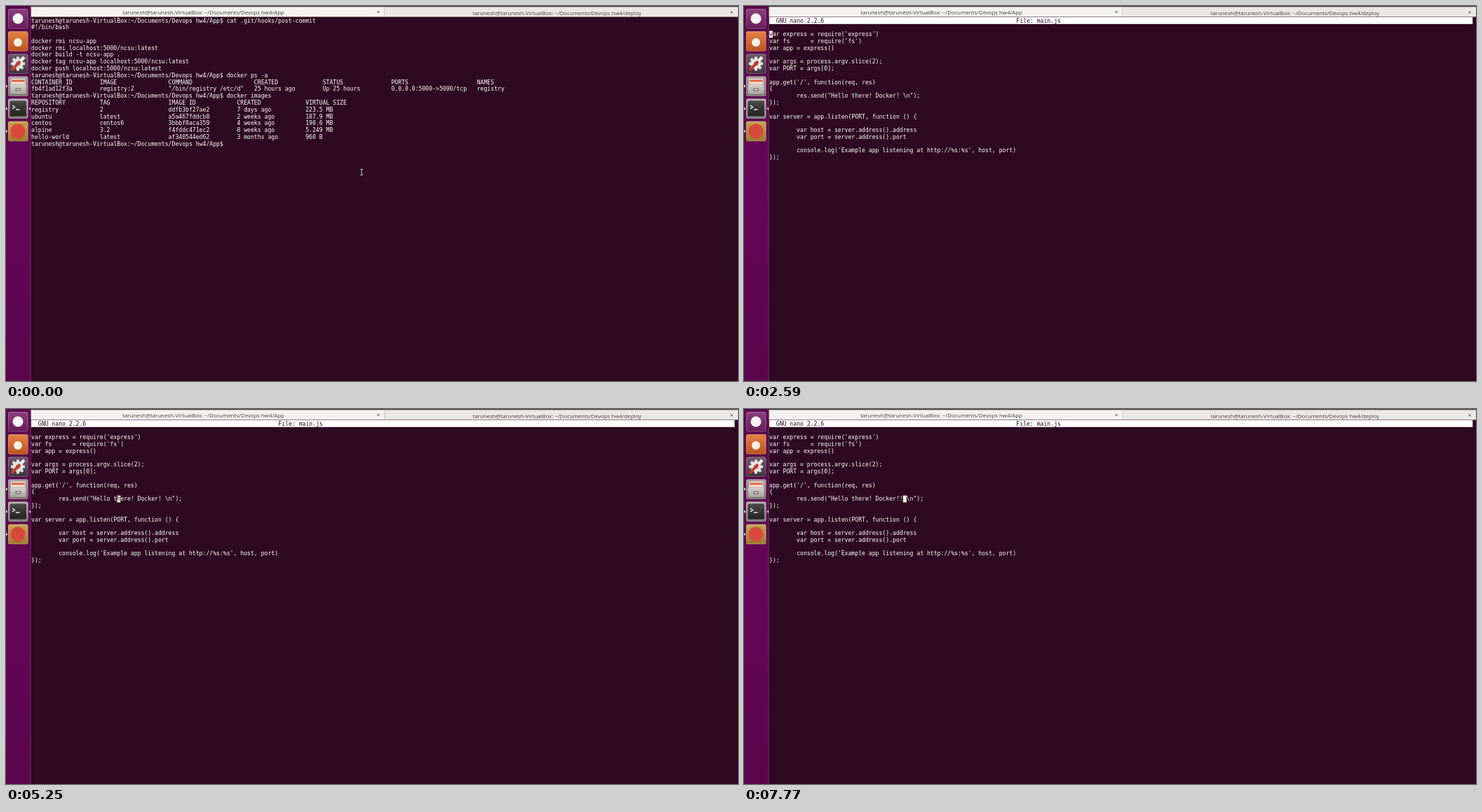
An HTML page with a canvas that plays this animation: 1044 by 536 pixels, repeating every 8 s.

```html
<!DOCTYPE html>
<html lang="en">
<head>
<meta charset="utf-8">
<title>Terminal session</title>
<style>
  html, body { margin: 0; width: 100%; height: 100%; overflow: hidden; background: #2e0922; }
  canvas { display: block; }
</style>
</head>
<body>
<canvas id="stage" width="1044" height="536"></canvas>
<script>
const ctx = document.getElementById('stage').getContext('2d');
const LOOP = 8000, TICK = 70;
const SCALE = 1044 / 1920;           // the desktop is 1920 units wide
const CELL_W = 9, CELL_H = 18;       // in desktop units
const LEFT = 36 / SCALE, TOP = 16 / SCALE;
const COLS = 205;
const BG = '#2e0922', FG = '#ffffff';
const MONO = '14.95px "DejaVu Sans Mono", monospace';
const SANS = '14.38px "Open Sans", "Noto Sans", sans-serif';

const USER = 'tarunesh@tarunesh-VirtualBox:';
const PROMPT = USER + '~/Documents/Devops hw4/App$ ';
const COMMAND = 'sudo nano main.js ';

// Lay out words at fixed columns
function table(cols, rows) {
  return rows.map(row => row.split('|').reduce((line, word, i) => line.padEnd(cols[i]) + word, ''));
}

const SHELL = [
  PROMPT + 'cat .git/hooks/post-commit',
  '#!/bin/bash',
  '',
  'docker rmi ncsu-app',
  'docker rmi localhost:5000/ncsu:latest',
  'docker build -t ncsu-app .',
  'docker tag ncsu-app localhost:5000/ncsu:latest',
  'docker push localhost:5000/ncsu:latest',
  PROMPT + 'docker ps -a',
  ...table([0, 20, 40, 65, 85, 105, 130], [
    'CONTAINER ID|IMAGE|COMMAND|CREATED|STATUS|PORTS|NAMES',
    'fb4f1ad12f3a|registry:2|"/bin/registry /etc/d"|25 hours ago|Up 25 hours|0.0.0.0:5000->5000/tcp|registry'
  ]),
  PROMPT + 'docker images',
  ...table([0, 20, 40, 60, 80], [
    'REPOSITORY|TAG|IMAGE ID|CREATED|VIRTUAL SIZE',
    'registry|2|ddfb3bf27ae2|7 days ago|223.5 MB',
    'ubuntu|latest|a5a467fddcb8|2 weeks ago|187.9 MB',
    'centos|centos6|3bbbf0aca359|4 weeks ago|190.6 MB',
    'alpine|3.2|f4fddc471ec2|8 weeks ago|5.249 MB',
    'hello-world|latest|af340544ed62|3 months ago|960 B'
  ])
];

const TAB = ' '.repeat(8);
const CODE = [
  '', '',
  "var express = require('express')",
  "var fs      = require('fs')",
  'var app = express()',
  '',
  'var args = process.argv.slice(2);',
  'var PORT = args[0];',
  '',
  "app.get('/', function(req, res)",
  '{',
  TAB + 'res.send("Hello there! Docker! \\n");',
  '});',
  '',
  'var server = app.listen(PORT, function () {',
  '',
  TAB + 'var host = server.address().address',
  TAB + 'var port = server.address().port',
  '',
  TAB + "console.log('Example app listening at http://%s:%s', host, port)",
  '});'
];
const EDIT_ROW = 11, EDIT_COL = 38;
const OPEN_AT = 2590, EDIT_AT = 6370, SAVE_AT = 7770, POINTER_UNTIL = 980;

// Typing: time of first key in a burst, then the typed lengths one tick apart
const typed = [];
function burst(start, ...lengths) {
  lengths.forEach((n, i) => typed.push([start + i * TICK, n]));
}
burst(980, 0, 1, 2);
burst(1260, 3, 4, 5);
burst(1540, 6, 7, 8);
burst(1820, 9, 10);
burst(2100, 11, 18);

// Cursor keys: time, row, column, visible
const cursor = [];
const put = (time, row, col, on = true) => cursor.push([time, row, col, on]);
put(0, 18, PROMPT.length, false);
put(210, 18, PROMPT.length);
put(700, 18, PROMPT.length, false);
typed.forEach(([time, n]) => put(time, 18, PROMPT.length + n));
put(OPEN_AT, 2, 0);
put(3080, 2, 0, false);
put(3220, 2, 0);
put(3290, 3, 0);
put(3710, 5, 0);
put(3780, 8, 0);
put(3850, 10, 0);
put(4060, EDIT_ROW, 0);
put(4340, EDIT_ROW, 8);
for (let i = 0; i < 12; i++) put(4760 + i * TICK, EDIT_ROW, 11 + 2 * i);
put(5600, EDIT_ROW, 36);
put(5670, EDIT_ROW, EDIT_COL);
put(EDIT_AT, EDIT_ROW, EDIT_COL + 1);
put(6860, EDIT_ROW, EDIT_COL + 1, false);
put(7420, EDIT_ROW, EDIT_COL + 1);
put(7630, EDIT_ROW, EDIT_COL + 1, false);
put(SAVE_AT, EDIT_ROW, EDIT_COL + 1);

const latest = (list, t) => list.filter(item => item[0] <= t).pop();

function box(x, y, w, h, fill, r = 0) {
  ctx.fillStyle = fill;
  ctx.beginPath();
  ctx.roundRect(x, y, w, h, r);
  ctx.fill();
}

function disc(x, y, r, fill) {
  ctx.fillStyle = fill;
  ctx.beginPath();
  ctx.arc(x, y, r, 0, Math.PI * 2);
  ctx.fill();
}

function path(points, color, width) {
  ctx.beginPath();
  points.forEach(([x, y]) => ctx.lineTo(x, y));
  if (width) {
    ctx.strokeStyle = color;
    ctx.lineWidth = width;
    ctx.stroke();
  } else {
    ctx.fillStyle = color;
    ctx.fill();
  }
}

function fade(y0, y1, ...colors) {
  const g = ctx.createLinearGradient(0, y0, 0, y1);
  colors.forEach((c, i) => g.addColorStop(i / (colors.length - 1), c));
  return g;
}

function tile(y, top, bottom) {
  box(3, y, 28.5, 28.5, fade(y, y + 28, top, bottom), 2.5);
  ctx.strokeStyle = 'rgba(255,255,255,0.28)';
  ctx.lineWidth = 0.8;
  ctx.beginPath();
  ctx.roundRect(3.6, y + 0.6, 27.3, 27.3, 2);
  ctx.stroke();
}

function drawGear(x, y) {
  ctx.save();
  ctx.translate(x, y);
  for (let i = 0; i < 8; i++) {
    ctx.rotate(Math.PI / 4);
    box(-2, -10, 4, 5, '#e4e2e0');
  }
  ctx.restore();
  disc(x, y, 7.5, '#e4e2e0');
  disc(x, y, 3, '#77716f');
}

function drawLauncher() {
  box(0, 0, 35, 536, fade(0, 536, '#55084a', '#660557', '#5a064c'));
  box(34.6, 0, 0.9, 536, '#7a3a6c');

  tile(4, '#8b3f7d', '#671c59');
  disc(17, 18, 7.5, '#f7f2f6');

  tile(36.2, '#e58245', '#b9541f');
  disc(17, 52, 6, '#fbeee4');

  tile(68.4, '#6d5a6a', '#3f3440');
  drawGear(17, 82.5);
  path([[8, 92], [21, 78]], '#c8372d', 4);
  path([[20, 79], [26, 73]], '#f2f0ef', 4.5);

  tile(100.4, '#a79f9b', '#77706c');
  box(7, 103.5, 20.5, 9, '#e0dcd7', 1);
  box(8, 105.5, 18.5, 7, '#de6742', 1);
  box(8, 108.5, 18.5, 3, '#f0ece6');
  box(6, 112, 22.5, 14, fade(112, 126, '#d5d1cc', '#aaa49e'), 1.5);
  box(13.5, 117.5, 7.5, 4, '#69635f', 1);
  box(15, 118.7, 4.5, 1.6, '#f2f0ec');

  tile(132.4, '#b3aeac', '#7d7876');
  box(5.5, 135.5, 23.5, 22, fade(135, 157, '#4b4a49', '#252423'), 1.5);
  path([[9, 142], [12.5, 144.5], [9, 147]], '#f4f4f4', 1.4);
  path([[14, 148], [19.5, 148]], '#f4f4f4', 1.4);

  tile(164.8, '#c6a553', '#9b7a2b');
  disc(17, 179, 10.5, '#d9483b');

  for (const y of [114.5, 146.7, 179]) {
    path([[0, y - 2.3], [2.5, y], [0, y + 2.3]], '#e4d8e2');
  }
  path([[35, 144.4], [32.5, 146.7], [35, 149]], '#e4d8e2');
}

function label(text, x, y, font, color) {
  ctx.save();
  ctx.scale(SCALE, SCALE);
  ctx.font = font;
  ctx.fillStyle = color;
  ctx.textAlign = 'center';
  ctx.fillText(text, x / SCALE, y / SCALE);
  ctx.restore();
}

function cross(x, y) {
  path([[x - 1.5, y - 1.5], [x + 1.5, y + 1.5]], '#4c4a47', 0.9);
  path([[x + 1.5, y - 1.5], [x - 1.5, y + 1.5]], '#4c4a47', 0.9);
}

function drawTabs() {
  box(35.5, 0, 1008.5, 1.2, '#3c3b37');
  box(35.5, 1.2, 504.5, 14.3, '#f4f2f0');
  box(540, 1.2, 504, 14.3, '#eae8e5');
  box(539.4, 1.2, 0.9, 14.3, '#c9c5c0');
  label(USER + ' ~/Documents/Devops hw4/App', 281.5, 11.8, SANS, '#45423f');
  label(USER + ' ~/Documents/Devops hw4/deploy', 786, 12.5, SANS, '#45423f');
  cross(531, 8.5);
  cross(1035, 9);
}

function write(text, row, col, color = FG) {
  ctx.fillStyle = color;
  ctx.fillText(text, LEFT + col * CELL_W, TOP + row * CELL_H + 13.8);
}

function fillCells(row, col, count) {
  ctx.fillStyle = FG;
  ctx.fillRect(LEFT + col * CELL_W, TOP + row * CELL_H, count * CELL_W, CELL_H);
}

function shellLines(t) {
  const n = (latest(typed, t) || [0, 0])[1];
  return [...SHELL, PROMPT + COMMAND.slice(0, n)];
}

function editorLines(t) {
  const lines = CODE.slice();
  if (t >= EDIT_AT) {
    const s = lines[EDIT_ROW];
    lines[EDIT_ROW] = s.slice(0, EDIT_COL) + '!' + s.slice(EDIT_COL);
  }
  return lines;
}

function drawTerminal(t) {
  const editing = t >= OPEN_AT;
  const lines = editing ? editorLines(t) : shellLines(t);
  ctx.save();
  ctx.scale(SCALE, SCALE);
  ctx.font = MONO;
  ctx.textAlign = 'left';
  lines.forEach((line, row) => write(line, row, 0));
  if (editing) {
    fillCells(0, 0, COLS);
    write('GNU nano 2.2.6', 0, 2, BG);
    write('File: main.js', 0, 72, BG);
    if (t >= EDIT_AT && t < SAVE_AT) write('Modified', 0, 195, BG);
  }
  const [, row, col, on] = latest(cursor, t);
  if (on) {
    fillCells(row, col, 1);
    write(lines[row][col] || ' ', row, col, BG);
  }
  ctx.restore();
}

function drawPointer(x, y) {
  const color = '#d8d0d5';
  path([[x, y - 4], [x, y + 4]], color, 0.9);
  for (const dy of [-4, 4]) path([[x - 2, y + dy], [x + 2, y + dy]], color, 0.9);
}

function draw(t) {
  box(0, 0, 1044, 536, BG);
  drawTerminal(t);
  drawTabs();
  drawLauncher();
  if (t < POINTER_UNTIL) drawPointer(507.2, 237.5);
}

let start;
function tick(now) {
  start ??= now;
  draw((now - start) % LOOP);
  requestAnimationFrame(tick);
}
draw(0);
requestAnimationFrame(tick);
</script>
</body>
</html>
```
